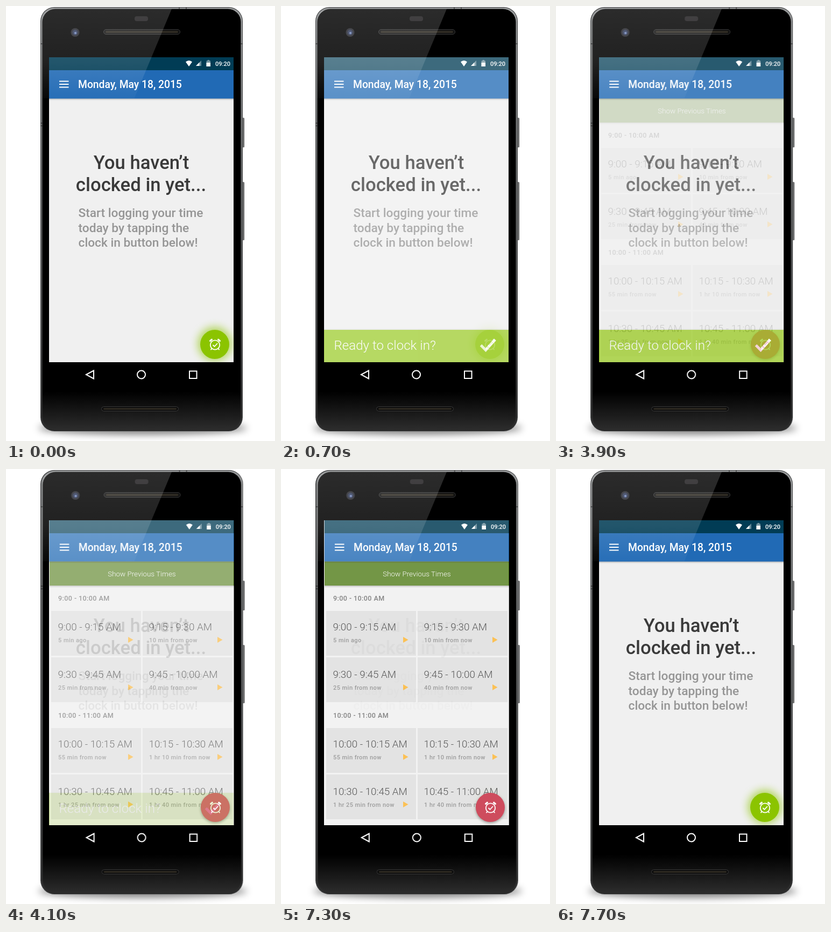
These frames come from a looping animation (500x806 px, 8 s). An HTML page:

```html
<!DOCTYPE html>
<html lang="en">
<head>
<meta charset="utf-8">
<style>
  html, body { margin: 0; width: 100%; height: 100%; overflow: hidden; background: #fff; }
  svg { display: block; width: 500px; height: 806px; font-family: Roboto, sans-serif; }
  .medium { font-weight: 500; }
  .light { font-weight: 300; }
  .line { fill: none; stroke: #fff; stroke-width: 2; }
  .section { font-size: 12.5px; letter-spacing: .43px; fill: #666; }
  .slot { font-size: 18.8px; fill: #2e2e2e; }
  .note { font-size: 11px; letter-spacing: .45px; fill: #858585; }
</style>
</head>
<body>
<svg viewBox="0 0 500 806">
  <defs>
    <filter id="blur" x="-20%" y="-150%" width="140%" height="400%"><feGaussianBlur stdDeviation="7"/></filter>
    <filter id="glow" x="-60%" y="-60%" width="220%" height="220%"><feGaussianBlur stdDeviation="8"/></filter>
    <filter id="soft" x="-50%" y="-50%" width="200%" height="200%"><feGaussianBlur stdDeviation="2.5"/></filter>
    <linearGradient id="metal" x2="0" y2="1">
      <stop stop-color="#9a9c9d"/><stop offset=".35" stop-color="#6c6e6f"/>
      <stop offset=".75" stop-color="#4a4b4c"/><stop offset="1" stop-color="#2a2a2a"/>
    </linearGradient>
    <linearGradient id="glass" x2="0" y2="1">
      <stop offset=".91"/><stop offset="1" stop-color="#2c2c2c"/>
    </linearGradient>
    <linearGradient id="key">
      <stop stop-color="#333"/><stop offset=".5" stop-color="#909293"/><stop offset="1" stop-color="#4a4a4a"/>
    </linearGradient>
    <linearGradient id="shine" x2="0" y2="1">
      <stop stop-color="#fff" stop-opacity=".17"/><stop offset=".6" stop-color="#fff" stop-opacity=".13"/>
      <stop offset="1" stop-color="#fff" stop-opacity=".03"/>
    </linearGradient>
    <linearGradient id="drop" x2="0" y2="1">
      <stop stop-opacity=".25"/><stop offset="1" stop-opacity="0"/>
    </linearGradient>
    <clipPath id="screen"><rect x="80" y="95" width="344" height="565"/></clipPath>

    <g id="phone">
      <g fill="url(#key)">
        <rect x="437" y="207" width="6" height="55" rx="1.5"/>
        <rect x="437" y="326" width="6" height="108" rx="1.5"/>
      </g>
      <rect x="64" y="2" width="376" height="786" rx="26" fill="#3a3b3c"/>
      <rect x="65" y="3" width="374" height="784" rx="25" fill="url(#metal)"/>
      <rect x="67.500" y="5.500" width="369" height="779" rx="24" fill="url(#glass)"/>
      <path d="M64 70H68M436 70H440M64 217H68M64 222H68M322 2V6M335 2V6" stroke="#222"/>
      <rect x="239" y="19" width="25" height="9" rx="4" fill="#1c1a1c"/>
      <rect x="181.500" y="43.500" width="142" height="9" rx="4.500" fill="#111" stroke="#383838"/>
      <rect x="185" y="46" width="135" height="4" rx="2" fill="#2e2a22"/>
      <rect x="177.500" y="742.500" width="143" height="8" rx="4" fill="#0c0c0c" stroke="#383838"/>
      <rect x="181" y="745" width="136" height="3" rx="1.500" fill="#2e2a22"/>
      <circle cx="128.500" cy="49" r="8" fill="#25262c"/>
      <circle cx="128.500" cy="49" r="5" fill="#303a58"/>
      <circle cx="129" cy="50" r="2.200" fill="#6f83b5"/>
      <path class="line" d="M149 683L163 675.500V690.500ZM341 676.500H354.500V690H341Z"/>
      <circle class="line" cx="251.500" cy="683" r="7.500"/>
    </g>

    <g id="header">
      <rect x="80" y="95" width="343" height="565" fill="#f0f0f0"/>
      <rect x="80" y="171" width="343" height="4" fill="url(#drop)"/>
      <rect x="80" y="95" width="343" height="24" fill="#013c55"/>
      <rect x="80" y="119" width="343" height="52.500" fill="#216ab5"/>
      <g fill="#fff" class="medium">
        <path d="M334 103.500Q340 98.500 346 103.500L340 112Z"/>
        <path d="M353 111L363 101V111Z" opacity=".4"/>
        <path d="M353 111L359.500 104.500V111Z"/>
        <path d="M374.500 100H378V101.500H380V112H372.500V101.500H374.500Z" opacity=".45"/>
        <path d="M372.500 105H380V112H372.500Z"/>
        <text x="389" y="111" font-size="11">09:20</text>
        <path d="M99 138.500H116.500V140.500H99ZM99 144H116.500V146H99ZM99 149.500H116.500V151.500H99Z"/>
        <text x="134" y="152" font-size="19.300">Monday, May 18, 2015</text>
      </g>
    </g>

    <g id="message" class="medium">
      <g font-size="34.700" text-anchor="middle" fill="#3a3a3a">
        <text x="251.500" y="302">You haven’t</text>
        <text x="251" y="343">clocked in yet...</text>
      </g>
      <g font-size="22.700" fill="#959595">
        <text x="134.500" y="391">Start logging your time</text>
        <text x="134.500" y="418.500">today by tapping the</text>
        <text x="134.500" y="446">clock in button below!</text>
      </g>
    </g>

    <g id="alarm" fill="none" stroke="#fff" stroke-width="1.800" stroke-linecap="round">
      <circle cx="388.500" cy="628" r="8.700"/>
      <path d="M385 628.500L387.500 631L392.500 625.500M382 635.500L381 636.500M395 635.500L396 636.500"/>
      <path d="M379.500 620.500L382.500 618M397.500 620.500L394.500 618" stroke-width="3"/>
    </g>
  </defs>

  <ellipse cx="254" cy="782" rx="194" ry="12" opacity=".5" filter="url(#blur)"/>
  <use href="#phone"/>
  <use href="#phone" x="1" id="shifted"/>
  <rect x="80" y="95" width="343" height="565" fill="#fff"/>

  <g clip-path="url(#screen)">
    <g class="page">
      <use href="#header"/>
      <use href="#message"/>
      <circle cx="388" cy="626" r="31" fill="#8bc400" opacity=".65" filter="url(#glow)"/>
      <circle cx="388" cy="627" r="27" fill="#8bc400"/>
      <use href="#alarm"/>
    </g>
    <g class="page">
      <use href="#header"/>
      <use href="#message"/>
      <rect x="80" y="598" width="343" height="2" opacity=".06"/>
      <rect x="80" y="600" width="343" height="60" fill="#8bc400"/>
      <text class="light" x="98.500" y="636.500" font-size="24.100" fill="#fff">Ready to clock in?</text>
      <path d="M371.500 628.500L380.500 637.500L398 618" fill="none" stroke="#fff" stroke-width="5"/>
    </g>
    <g class="page">
      <use href="#header" x="1"/>
      <rect x="81" y="216" width="343" height="4" fill="url(#drop)"/>
      <rect x="81" y="171.500" width="343" height="44.500" fill="#527d19"/>
      <rect x="81" y="171.500" width="343" height="3" fill="url(#drop)"/>
      <text class="light" x="252.500" y="199" font-size="13.400" text-anchor="middle" fill="#fff">Show Previous Times</text>
      <text class="medium section" x="97" y="244">9:00 - 10:00 AM</text>
      <text class="medium section" x="97" y="460.500">10:00 - 11:00 AM</text>
      <g id="slots"></g>
      <circle cx="389" cy="629" r="27" opacity=".45" filter="url(#soft)"/>
      <circle cx="389" cy="627" r="27" fill="#c92342"/>
      <use href="#alarm" x="1"/>
    </g>
  </g>
  <path d="M92 5.500H308L238.500 171H67.500V30Q67.500 5.500 92 5.500Z" fill="url(#shine)"/>
</svg>
<script>
  const rows = [[263, 292], [349, 380], [480, 509], [566, 597]]; // tile top, title middle
  const notes = ["5 min ago", "10 min from now", "25 min from now", "40 min from now",
    "55 min from now", "1 hr 10 min from now", "1 hr 25 min from now", "1 hr 40 min from now"];
  const clock = m => `${Math.floor(m / 60)}:${String(m % 60).padStart(2, "0")}`;

  document.getElementById("slots").innerHTML = notes.map((note, i) => {
    const col = i % 2, [top, mid] = rows[i >> 1], start = 540 + i * 15;
    const x = 96.5 + col * 169;
    return `<rect x="${84 + col * 170}" y="${top}" width="167" height="83" fill="#dedede"/>
      <text class="light slot" x="${x}" y="${mid + 7}">${clock(start)} - ${clock(start + 15)} AM</text>
      <text class="medium note" x="${x + .5}" y="${mid + 28.5}">${note}</text>
      <path d="M${227 + col * 166} ${mid + 19}l9.500 5.500l-9.500 5.500z" fill="#fcb32c"/>`;
  }).join("");

  const pages = document.querySelectorAll(".page");
  const shifted = document.getElementById("shifted");
  const fades = [500, 3900, 7300];

  function draw(now) {
    const t = now % 8000;
    const alpha = [1, 0, 0];
    fades.forEach((start, i) => {
      if (t < start) return;
      const p = Math.min(5, Math.floor((t - start) / 100) + 1) / 5;
      alpha[i] = 1 - p;
      alpha[(i + 1) % 3] = p;
    });
    pages.forEach((page, i) => page.setAttribute("opacity", alpha[i]));
    shifted.setAttribute("opacity", alpha[2]);
    requestAnimationFrame(draw);
  }
  requestAnimationFrame(draw);
</script>
</body>
</html>
```
